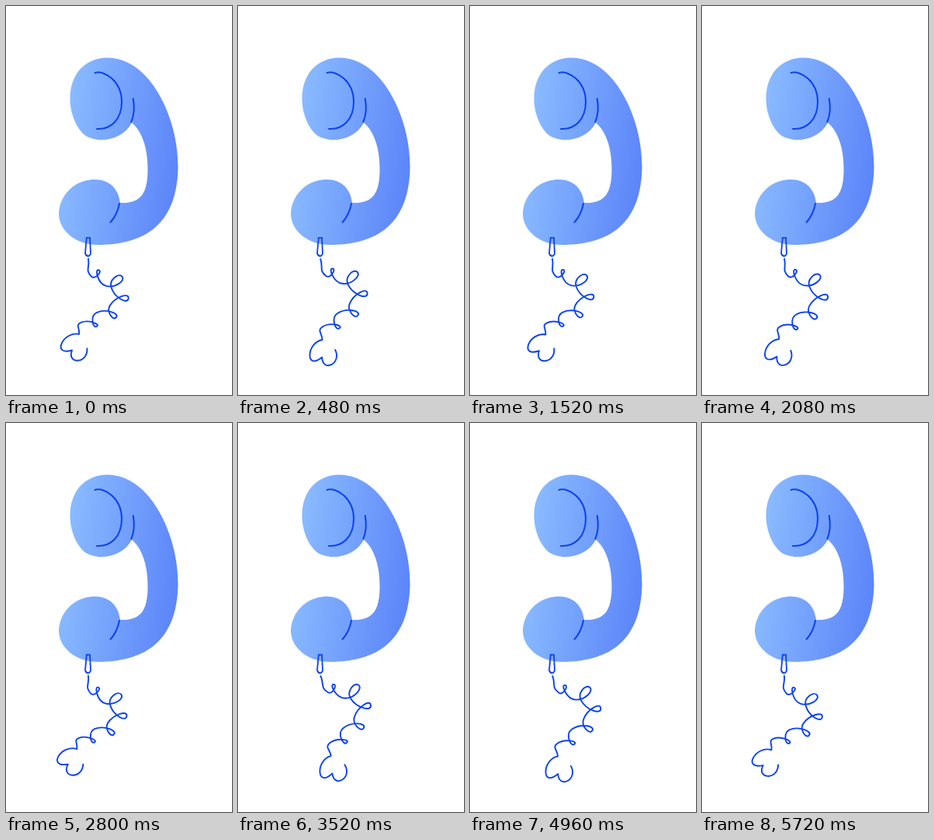
Animation of 291x500 px, one loop 5760 ms. Source, as an HTML page with a canvas:

```html
<!DOCTYPE html>
<html lang="en">
<head>
<meta charset="utf-8">
<title>Swinging receiver</title>
<style>
html, body { margin: 0; width: 100%; height: 100%; overflow: hidden; background: #fff; }
canvas { display: block; width: 291px; height: 500px; }
</style>
</head>
<body>
<canvas id="stage"></canvas>
<script>
const W = 291, H = 500, LOOP = 5760, STEP = 40;
const INK = '#0b42ee', RAD = Math.PI / 180;
const canvas = document.getElementById('stage');
const ctx = canvas.getContext('2d');
const dpr = window.devicePixelRatio || 1;
canvas.width = W * dpr;
canvas.height = H * dpr;

const body = new Path2D(`M162 150 C152 169 127 177 107 169 C92 163 82 138 82.5 118
  C83 87 102 67 130 66.5 C186 66 222 145 221.5 206 C221 274 186 307 118 307
  C88 307 68 287 68 267 C69 243 88 224 112 223 C133 222 145 235 147 253
  C172 254 182.5 243 182.5 210 C182.5 184 176 162 162 150 Z`);
const creases = new Path2D(`M114.5 86 C127 82 149 97 149 123 C149 146 135 159 117 158
  M163.7 119 C166 131 165 140 161.3 149 M146 254 C144 264 141 271 134.5 278`);
const plug = new Path2D('M103.8 297.8 H108 L109 318 Q108 321.5 105.5 321.5 Q102.5 321 102 317.5 Z');

const PIN = [107, 323.5], TAIL = [95, 420];
// Even knots are loop tips, odd knots the arcs between them
const knots = [
  [106, 325], [110, 347.5], [120, 339.5], [129, 359.5], [149, 347], [135.5, 361],
  [157.5, 375], [134, 384], [141.5, 399.5], [117, 393], [117, 410.5], [97, 405.5], TAIL
];
const LAST = knots.length - 1;
const lobes = [
  [[75, 414], [57, 446], [84.5, 440]],
  [[76, 458], [104, 459], [104, 439]]
];

// Ends of each swing: time in ms, angle in degrees
const turns = [
  [270, -11], [1100, 9.5], [1835, -8.5], [2530, 12],
  [3280, -22], [3995, 9.5], [4730, -20], [5410, 17.5]
];

function pose(t) {
  const n = turns.length;
  const next = turns.findIndex(k => k[0] > t);
  const i = ((next < 0 ? n : next) + n - 1) % n;
  const [t0, a] = turns[i], [t1, b] = turns[(i + 1) % n];
  const wrap = d => (d + LOOP) % LOOP;
  const u = wrap(t - t0) / wrap(t1 - t0) * Math.PI;
  const phase = u + i * Math.PI;
  return {
    swing: ((a + b) / 2 + (a - b) / 2 * Math.cos(u)) * RAD,
    lag: 8.5 + 10.5 * Math.cos(phase - 35 * RAD)
  };
}

function rotate([x, y], from, to, angle, scale = 1) {
  const dx = (x - from[0]) * scale, dy = (y - from[1]) * scale;
  const c = Math.cos(angle), s = Math.sin(angle);
  return [to[0] + dx * c - dy * s, to[1] + dx * s + dy * c];
}

// Arcs run forward along the cord, loop tips run backward
function heading(pts, i) {
  const tip = i % 2 === 0 && i > 0 && i < LAST;
  const span = tip ? 2 : 1;
  const p = pts[Math.max(0, i - span)], q = pts[Math.min(LAST, i + span)];
  const dx = q[0] - p[0], dy = q[1] - p[1];
  const reach = (tip ? -0.32 : 0.52) / Math.hypot(dx, dy);
  return [dx * reach, dy * reach];
}

function curl(pts) {
  ctx.moveTo(...pts[0]);
  for (let i = 0; i < LAST; i++) {
    const p = pts[i], q = pts[i + 1];
    const d = Math.hypot(q[0] - p[0], q[1] - p[1]);
    const h = heading(pts, i), k = heading(pts, i + 1);
    ctx.bezierCurveTo(p[0] + h[0] * d, p[1] + h[1] * d, q[0] - k[0] * d, q[1] - k[1] * d, ...q);
  }
}

function drawReceiver() {
  const fill = ctx.createLinearGradient(76, 150, 224, 170);
  fill.addColorStop(0, '#8abbff');
  fill.addColorStop(1, '#5d86f9');
  ctx.fillStyle = fill;
  ctx.fill(body);
  ctx.lineWidth = 2;
  ctx.stroke(creases);
  ctx.lineWidth = 1.8;
  ctx.stroke(plug);
}

function drawCord(t) {
  const { swing, lag } = pose(t);
  const stretch = lag * 0.0045;
  const pts = knots.map((p, i) => rotate(p, PIN, PIN, swing, 1 + stretch * i / LAST));
  const hang = p => rotate(p, TAIL, pts[LAST], swing - lag * RAD);
  ctx.lineWidth = 1.9;
  ctx.beginPath();
  curl(pts);
  lobes.forEach(l => ctx.bezierCurveTo(...l.flatMap(hang)));
  ctx.stroke();
}

function draw(t) {
  ctx.setTransform(dpr, 0, 0, dpr, 0, 0);
  ctx.fillStyle = '#fff';
  ctx.fillRect(0, 0, W, H);
  ctx.strokeStyle = INK;
  ctx.lineCap = ctx.lineJoin = 'round';
  drawReceiver();
  drawCord(t);
}

const start = performance.now();
function tick() {
  const t = (performance.now() - start) % LOOP;
  draw(Math.floor(t / STEP) * STEP);
  requestAnimationFrame(tick);
}
tick();
</script>
</body>
</html>
```
